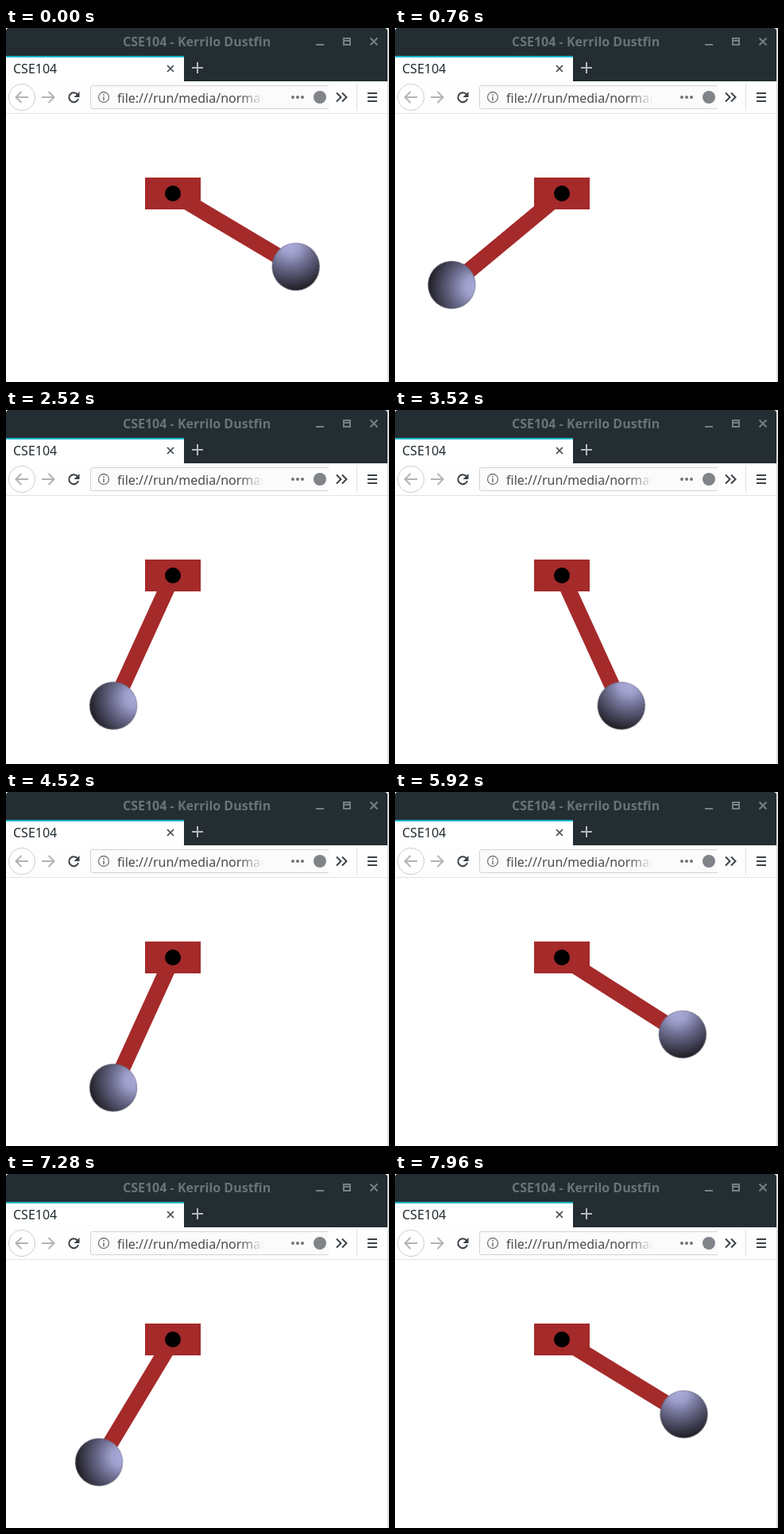
These frames come from a looping animation (482 px wide and 445 px high, 8 s). An HTML page:

```html
<!DOCTYPE html>
<html lang="en">
<head>
<meta charset="utf-8">
<title>CSE104</title>
<style>
  html, body { margin: 0; width: 100%; height: 100%; overflow: hidden; background: #fff; }
  svg { display: block; width: 482px; height: 445px; }
  text { font: 16px "Noto Sans", sans-serif; }
  .line { fill: none; stroke-width: 2; }
  #pendulum { transform-origin: 210px 208px; }
</style>
</head>
<body>
<svg viewBox="0 0 482 445">
  <defs>
    <radialGradient id="shade" gradientUnits="userSpaceOnUse" cx="230" cy="368" r="59">
      <stop offset="0" stop-color="#aaaada"/>
      <stop offset=".2" stop-color="#9f9fcd"/>
      <stop offset=".5" stop-color="#69698a"/>
      <stop offset="1" stop-color="#1b1a20"/>
    </radialGradient>
    <linearGradient id="fade" gradientUnits="userSpaceOnUse" x1="294" x2="324" y1="0" y2="0">
      <stop offset="0" stop-color="#fbfbfc" stop-opacity="0"/>
      <stop offset="1" stop-color="#fbfbfc"/>
    </linearGradient>
  </defs>

  <!-- Window frame -->
  <rect x="480" width="2" height="445" fill="#dcdddd"/>
  <path d="M0 67V4Q0 0 4 0H476Q480 0 480 4V67Z" fill="#232d32"/>
  <text x="147" y="23" fill="#697378" style="font-weight:700">CSE104 - Kerrilo Dustfin</text>
  <g class="line" stroke="#758086">
    <path d="M390 21H400M424 13H434M458.500 12.500L467.500 21.500M467.500 12.500L458.500 21.500"/>
    <path d="M425 13V21H433V13M425 16H433"/>
  </g>

  <!-- Tab -->
  <rect y="35" width="224" height="32" fill="#fff"/>
  <rect y="35" width="224" height="2" fill="#16b5c6"/>
  <text x="9" y="57" fill="#202b30">CSE104</text>
  <path class="line" d="M203 47L211 55M211 47L203 55" stroke="#40484d" style="stroke-width:1.7"/>
  <path class="line" d="M234 50H248M241 43V57" stroke="#b3b9bc"/>

  <!-- Toolbar -->
  <rect y="67" width="480" height="40" fill="#fefefe"/>
  <rect y="107" width="480" height="1" fill="#e3e3e4"/>
  <circle cx="20" cy="87" r="16.500" fill="#fff" stroke="#cdcdce"/>
  <g class="line" stroke="#b3b3b5">
    <path d="M28 87H13M19.500 80L12.500 87L19.500 94"/>
    <path d="M45 87H60M53.500 80L60.500 87L53.500 94"/>
  </g>
  <path class="line" d="M90 83.500A6 6 0 1 0 91 89" stroke="#3c4247"/>
  <path d="M92.500 80V87H85.500Z" fill="#3c4247"/>

  <path d="M406 72.500H109Q106.500 72.500 106.500 75V99Q106.500 101.500 109 101.500H406" fill="#fbfbfc" stroke="#d3d3d5"/>
  <circle cx="123" cy="87" r="6.500" fill="none" stroke="#77777b" stroke-width="1.300"/>
  <path class="line" d="M123 83V84.700M123 86.200V91" stroke="#77777b" style="stroke-width:1.600"/>
  <text x="140" y="94" fill="#4c4c51">file:///run/media/norman</text>
  <rect x="294" y="76" width="56" height="23" fill="url(#fade)"/>
  <g fill="#737377">
    <circle cx="361" cy="87" r="2"/>
    <circle cx="367" cy="87" r="2"/>
    <circle cx="373" cy="87" r="2"/>
  </g>
  <circle cx="395" cy="87" r="8" fill="#808488"/>
  <path class="line" d="M416 81.500L421.500 87L416 92.500M423 81.500L428.500 87L423 92.500" stroke="#3c4247"/>
  <path d="M441.500 70V104" stroke="#e0e0e1"/>
  <path class="line" d="M455 82H467M455 87H467M455 92H467" stroke="#3c4247"/>

  <!-- Pendulum -->
  <rect x="175" y="188" width="70" height="40" fill="brown"/>
  <g id="pendulum">
    <rect x="200" y="208" width="20" height="180" fill="brown"/>
    <circle cx="210" cy="388" r="30" fill="url(#shade)"/>
    <circle cx="210" cy="388" r="29.500" fill="none" stroke="#55555f" stroke-opacity=".45"/>
  </g>
  <circle cx="210" cy="208" r="10"/>
</svg>
<script>
  const swing = [60, -60, 60].map(angle => ({ transform: `rotate(${angle}deg)`, easing: "ease" }));
  document.getElementById("pendulum").animate(swing, {
    duration: 2000,
    delay: -895,
    iterations: Infinity
  });
</script>
</body>
</html>
```
